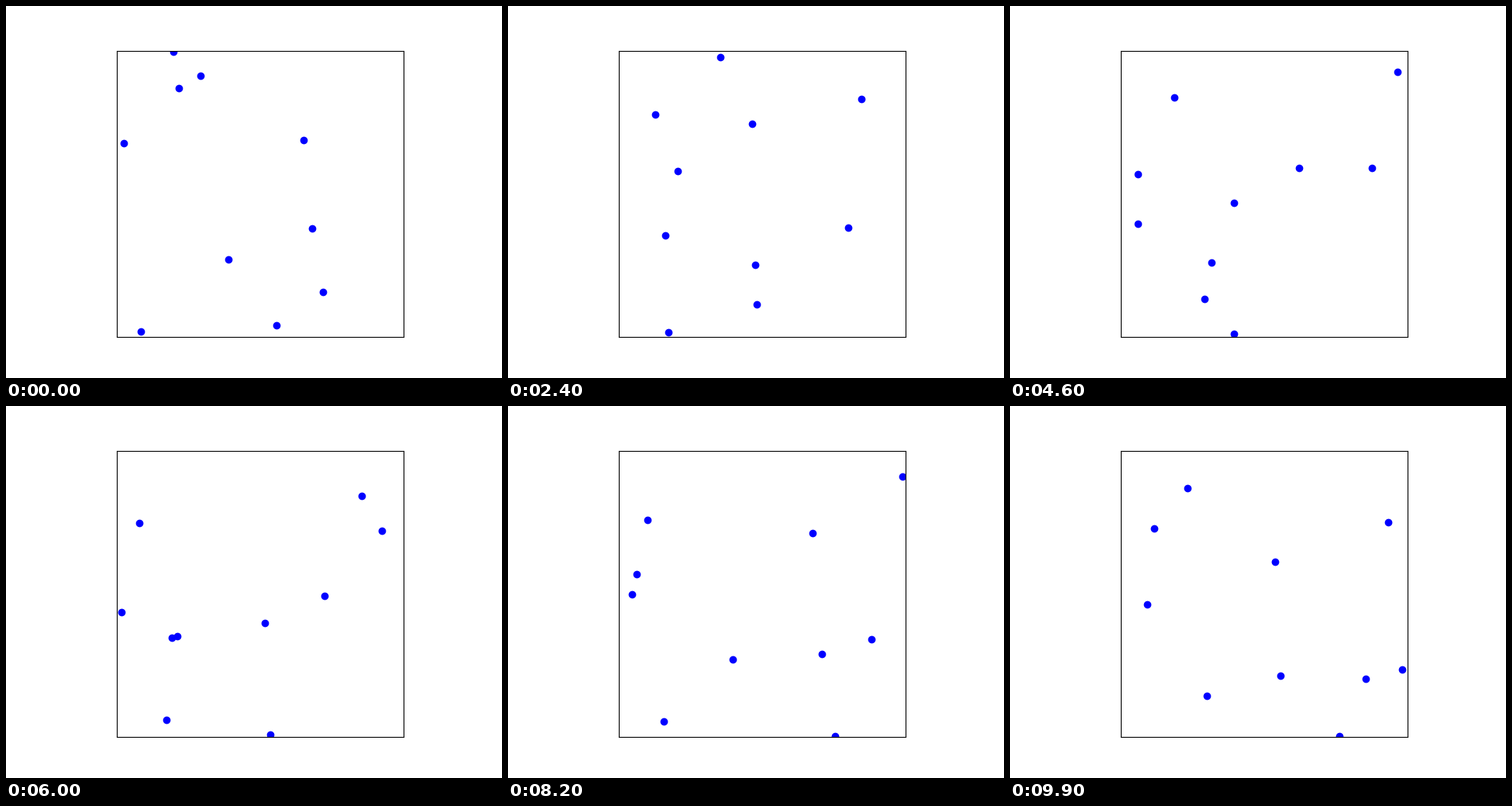
Write a matplotlib script that moves like this. It is 640 px wide and 480 px high and loops after 10 s.

```python
import numpy as np
import matplotlib.pyplot as plt
from matplotlib.animation import FuncAnimation

FRAMES = 100
SPEED = 0.01
LOOK = np.array([1, 0])  # side walls are felt one step early

# Starting state of the ten particles in the unit box; rules do the rest
X = [.197, .292, .216, .023, .652, .680, .388, .718, .556, .084]
Y = [.995, .911, .868, .678, .688, .379, .272, .158, .041, .019]
HEADING = [71.7, -44, 39.7, 150.1, 36.3, -147.8, 159.8, 69.8, -41.4, 178.54]


def outside(p):
    return (p < 0) | (p > 1)


def fly(pos, vel):
    """Yield positions: straight flight, turning right back at a wall."""
    while True:
        yield pos
        ahead = pos + vel
        hit = outside(ahead + LOOK * vel)
        pos = np.where(hit, pos, ahead)
        vel = np.where(hit.any(axis=1, keepdims=True), -vel, vel)


angle = np.radians(HEADING)
start = np.column_stack([X, Y])
velocity = SPEED * np.column_stack([np.cos(angle), np.sin(angle)])
path = [pos for pos, _ in zip(fly(start, velocity), range(FRAMES))]

fig = plt.figure(figsize=(6.4, 4.8), dpi=100)
ax = fig.add_subplot(aspect="equal", xlim=(0, 1), ylim=(0, 1),
                     xticks=[], yticks=[])
dots, = ax.plot([], [], "bo", markersize=6)


def update(i):
    dots.set_data(*path[i].T)
    return dots,


anim = FuncAnimation(fig, update, frames=FRAMES, interval=100,
                     repeat=True, repeat_delay=0)
plt.show()
```
